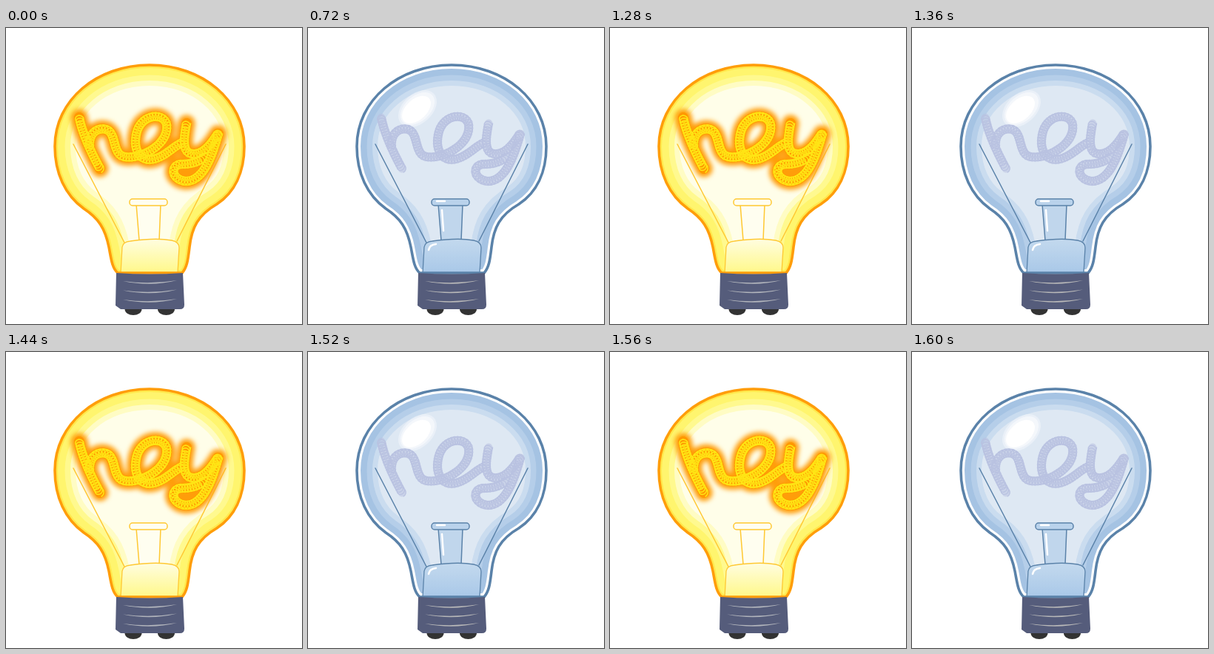
Animation of 400x400 px, one loop 1.8 s. Source, as an HTML page:

```html
<!DOCTYPE html>
<html lang="en">
<head>
<meta charset="utf-8">
<title>Flickering bulb</title>
<style>
  html, body { margin: 0; width: 100%; height: 100%; overflow: hidden; background: #fff; }
  svg {
    display: block; width: 100vw; height: 100vh; fill: none;
    stroke-linecap: round; stroke-linejoin: round;
    --line: #5a82a9; --thin: #5a82a9; --rim: #fff;
    --b1: #a5c3e3; --b2: #b5cee9; --b3: #cadcef; --core: #dee8f3;
    --stem: #c0d6ec; --top: #b9d2eb; --boxTop: #c3d9ee; --boxLow: #a9c8e8;
    --coil: #b9c2e1; --thread: #b9b9b9;
  }
  svg.on {
    --line: #ff9d0a; --thin: #ffc832; --rim: #ffe94d;
    --b1: #fff56e; --b2: #fff98f; --b3: #fffcc4; --core: #fffee9;
    --stem: #fffef0; --top: #fffef0; --boxTop: #fffde0; --boxLow: #fff889;
    --coil: #ffe414; --thread: #b3b6bd;
  }
  .on .off-only, svg:not(.on) .on-only { display: none; }
  .core { fill: var(--core); }
  .b3 { stroke: var(--b3); stroke-width: 56; }
  .b2 { stroke: var(--b2); stroke-width: 42; }
  .b1 { stroke: var(--b1); stroke-width: 27; }
  .rim { stroke: var(--rim); stroke-width: 10; }
  .on .rim { stroke-width: 8; }
  .line { stroke: var(--line); stroke-width: 3.6; }
  .thin { stroke: var(--thin); stroke-width: 1.5; }
  .stem { fill: var(--stem); }
  .top { fill: var(--top); }
  .coil { stroke: var(--coil); stroke-width: 1.25; }
  .on .coil { stroke-width: 1.5; }
  .soft { filter: blur(3px); }
  .shine { fill: #fff; }
</style>
</head>
<body>
<svg id="bulb" viewBox="0 0 400 400">
  <defs>
    <path id="glass" d="M151 331C143 324 142 311 139 296C134 271 125 257 105 244C80 226 66 196 66 160C66 98 122 50 194 50C266 50 322 98 322 160C322 195 309 222 285 238C259 253 251 270 248 296C246 312 245 323 238 331Z"/>
    <path id="word" d="M99 121C103 143 117 172 127 190M113 158C112 142 124 134 135 137C150 141 143 171 160 174C181 178 221 158 217 130C213 114 184 116 177 140C170 165 182 182 200 177C216 173 226 160 238 155M244 129C240 150 238 168 251 170C266 172 278 156 286 143M287 143C280 166 269 208 242 207C222 204 222 184 238 184C252 184 262 180 268 174"/>
    <clipPath id="inside"><use href="#glass"/></clipPath>
    <linearGradient id="boxFill" x2="0" y2="1">
      <stop stop-color="var(--boxTop)"/><stop offset="1" stop-color="var(--boxLow)"/>
    </linearGradient>
  </defs>

  <g fill="#333">
    <ellipse cx="172" cy="380" rx="11.5" ry="8"/>
    <ellipse cx="216.500" cy="380" rx="11.5" ry="8"/>
  </g>

  <g clip-path="url(#inside)">
    <use href="#glass" class="core"/>
    <use href="#glass" class="b3"/>
    <use href="#glass" class="b2"/>
    <use href="#glass" class="b1"/>
    <use href="#glass" class="rim"/>
  </g>

  <g class="off-only shine" transform="rotate(-42 148 109)">
    <ellipse cx="148" cy="109" rx="30" ry="20" opacity=".35"/>
    <ellipse cx="148" cy="109" rx="27" ry="17" opacity=".5"/>
    <ellipse cx="146" cy="109" rx="23" ry="14"/>
  </g>

  <g class="thin">
    <path d="M91 157L160 290M297 157L231 288"/>
    <path class="stem" d="M176 238L180 287H207L209 238Z"/>
    <path fill="url(#boxFill)" d="M155 331L157 296Q158 289 168 288C189 285 208 284 224 287Q234 289 234 297L232 331" stroke-width="1.3"/>
    <rect class="top" x="167" y="231" width="51" height="9" rx="4"/>
  </g>
  <g class="off-only" stroke="#fff" stroke-width="2.5">
    <path d="M181 246L183 274M163 300Q164 293 173 292M174 234H185"/>
  </g>

  <use href="#glass" class="line"/>

  <g class="on-only" stroke="#ff9d0a">
    <use href="#word" class="soft" stroke-width="23"/>
    <use href="#word" stroke="#ff9800" stroke-width="14"/>
  </g>
  <use href="#word" class="off-only" stroke="#b9c2e1" stroke-width="11" opacity=".55"/>
  <path id="coil" class="coil"/>

  <path fill="#555c7b" d="M149 331Q194 334 239 331L241 374Q241 380 235 380H155L148 375Z"/>
  <g fill="var(--thread)">
    <path id="thread" d="M158 342Q195 347 231 341Q196 350 158 342Z"/>
    <use href="#thread" y="12.500"/>
    <use href="#thread" y="25"/>
  </g>
</svg>
<script>
const bulb = document.getElementById('bulb');
const LOOP = 1800;
const litSpans = [[0, 720], [1280, 1360], [1440, 1520], [1560, 1600]];

// Wind a spring around each stroke of the word.
function wind(d, radius = 5.6, pitch = 3.7) {
  const track = document.createElementNS('http://www.w3.org/2000/svg', 'path');
  track.setAttribute('d', d);
  const length = track.getTotalLength();
  const points = [];
  for (let s = 0; s <= length; s += pitch / 16) {
    const p = track.getPointAtLength(s);
    const a = s / pitch * 2 * Math.PI;
    points.push(`${(p.x + radius * Math.cos(a)).toFixed(1)} ${(p.y + radius * Math.sin(a)).toFixed(1)}`);
  }
  return 'M' + points.join('L');
}

const strokes = document.getElementById('word').getAttribute('d').match(/M[^M]+/g);
document.getElementById('coil').setAttribute('d', strokes.map(d => wind(d)).join(''));

function draw() {
  const t = performance.now() % LOOP;
  bulb.classList.toggle('on', litSpans.some(([from, to]) => t >= from && t < to));
  requestAnimationFrame(draw);
}
draw();
</script>
</body>
</html>
```
